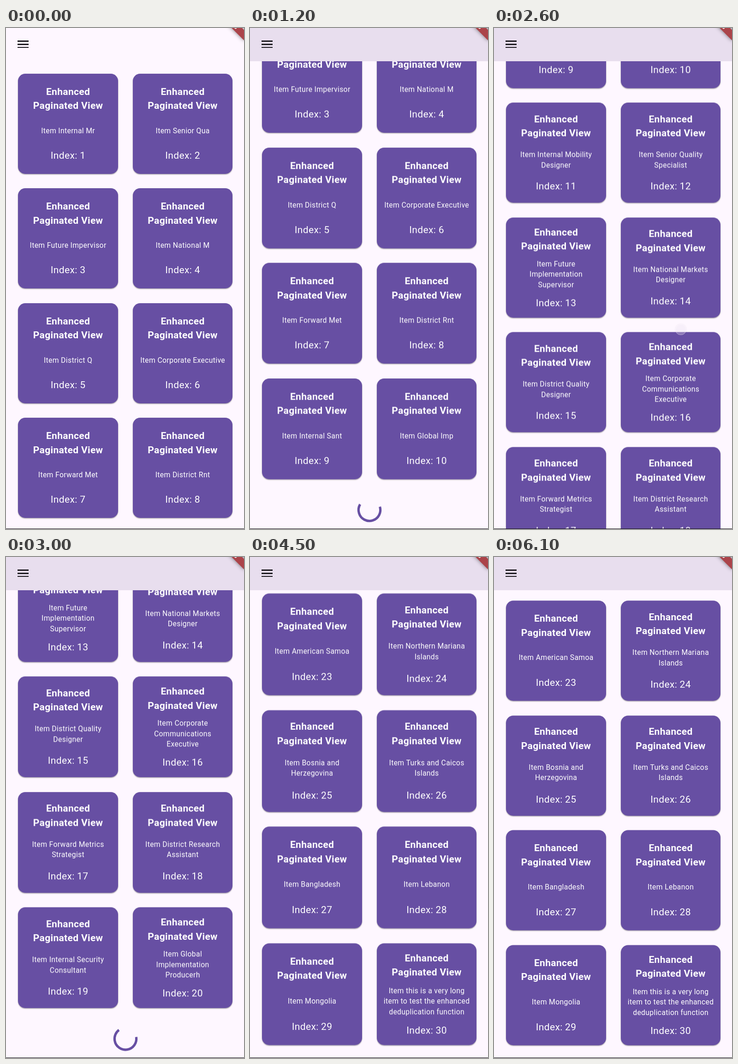
Write an HTML page that moves like this. It is 516x1085 px and loops after 6.2 s.

```html
<!DOCTYPE html>
<html lang="en">
<head>
<meta charset="utf-8">
<title>Paginated grid</title>
<style>
html, body { margin: 0; width: 100%; height: 100%; overflow: hidden; background: #fef7ff; }
#stage { position: relative; width: 516px; height: 1085px; overflow: hidden; background: #fef7ff;
  font-family: Roboto, "Noto Sans", sans-serif; color: #fff; letter-spacing: .3285px; }
#list { position: absolute; left: 0; top: 0; width: 516px; transform-origin: 0 0; will-change: transform; }
.card { position: absolute; width: 216.8px; height: 217px; border-radius: 15.8px; background: #674fa3;
  box-shadow: 0 1.3px 2px rgba(0, 0, 0, .28), 0 1px 3px rgba(0, 0, 0, .12); }
.card div { position: absolute; left: 0; width: 100%; text-align: center; white-space: pre;
  transform: translateY(-50%); }
.title { font-size: 21.02px; font-weight: 600; line-height: 30.4px; }
.name { font-size: 15.77px; line-height: 22.5px; }
.index { font-size: 21.02px; line-height: 30px; }
#spinner { position: absolute; left: 229px; width: 60px; height: 60px; }
#touch { position: absolute; left: 393px; width: 24px; height: 24px; margin-top: -12px; border-radius: 50%;
  box-sizing: border-box; background: rgba(236, 226, 240, .5); border: 1.5px solid rgba(255, 250, 255, .6);
  box-shadow: 0 0 2px rgba(90, 70, 110, .25); }
#bar { position: absolute; left: 0; top: 0; width: 516px; height: 71.7px; background: #e8deee; }
.menu { position: absolute; left: 25.2px; width: 23.65px; height: 2.6px; background: #1d1b20; }
#ribbon { position: absolute; left: 431.8px; top: -24.3px; width: 105px; height: 15.8px; line-height: 15.8px;
  transform: rotate(45deg); background: #ab444a; box-shadow: 0 0 8px rgba(0, 0, 0, .5);
  font-size: 13.4px; font-weight: 900; letter-spacing: 1.3px; text-align: center; }
#edge { position: absolute; left: 0; top: 1083.7px; width: 516px; height: 2px; background: #17131a; }
</style>
</head>
<body>
<div id="stage">
  <div id="list">
    <svg id="spinner" viewBox="-30 -30 60 60">
      <circle id="arc" r="23.65" fill="none" stroke="#674fa3" stroke-width="5.25" pathLength="360"/>
    </svg>
  </div>
  <div id="touch"></div>
  <div id="bar"></div>
  <div class="menu" style="top:27.4px"></div>
  <div class="menu" style="top:34px"></div>
  <div class="menu" style="top:40.6px"></div>
  <div id="ribbon">DEBUG</div>
  <div id="edge"></div>
</div>
<script>
const LOOP = 6200, STEP = 100, HEIGHT = 1085, PITCH = 248.5;
const $ = id => document.getElementById(id);

// "|" breaks a line
const names = [
  'Internal Mr', 'Senior Qua', 'Future Impervisor', 'National M', 'District Q',
  'Corporate Executive', 'Forward Met', 'District Rnt', 'Internal Sant', 'Global Imp',
  'Internal Mobility|Designer', 'Senior Quality|Specialist', 'Future|Implementation|Supervisor',
  'National Markets|Designer', 'District Quality|Designer', 'Corporate|Communications|Executive',
  'Forward Metrics|Strategist', 'District Research|Assistant', 'Internal Security|Consultant',
  'Global|Implementation|Producerh',
  'Saint Lucia', 'United Arab|Emirates', 'American Samoa', 'Northern Mariana|Islands',
  'Bosnia and|Herzegovina', 'Turks and Caicos|Islands', 'Bangladesh', 'Lebanon', 'Mongolia',
  'this is a very long|item to test the enhanced|deduplication function'
];

function addText(card, cls, y, text) {
  const el = document.createElement('div');
  el.className = cls;
  el.style.top = y + 'px';
  el.textContent = text;
  card.append(el);
}

const cards = names.map((name, i) => {
  const card = document.createElement('div');
  const lines = name.split('|').length;
  card.className = 'card';
  card.style.left = 26.2 + PITCH * (i % 2) + 'px';
  card.style.top = 98.7 + PITCH * (i >> 1) + 'px';
  addText(card, 'title', 57.8 - 3.55 * lines, 'Enhanced\nPaginated View');
  addText(card, 'name', 124, 'Item ' + name.replaceAll('|', '\n'));
  addText(card, 'index', 173.3 + 4 * lines, 'Index: ' + (i + 1));
  $('list').append(card);
  return card;
});

// [time, value] pairs, linear between
const scrollKeys = [[800, 0], [900, 40], [1000, 200], [1100, 332], [2300, 332], [2400, 420], [2600, 1179.5],
  [2700, 1490], [2800, 1574.5], [4100, 1574.5], [4200, 1700], [4400, 2590], [4460, 2737.5]];
const stretchKeys = [[1050, 0], [1100, .004], [1200, .006], [1600, 0], [2750, 0], [2800, .01], [2900, .009],
  [3200, 0], [4440, 0], [4500, .0157], [4600, .0135], [4900, .004], [5200, 0]];
const touchKeys = [[2400, 760], [2500, 653]];

function track(keys, t) {
  const n = keys.findIndex(k => k[0] > t);
  if (n === 0) return keys[0][1];
  if (n < 0) return keys[keys.length - 1][1];
  const [t0, a] = keys[n - 1], [t1, b] = keys[n];
  return a + (b - a) * (t - t0) / (t1 - t0);
}

const clamp = x => Math.min(1, Math.max(0, x));

// cubic-bezier(.4, 0, .2, 1)
function ease(x) {
  let lo = 0, hi = 1, s = .5;
  for (let i = 0; i < 24; i++) {
    s = (lo + hi) / 2;
    const bx = 1.2 * s * (1 - s) ** 2 + .6 * s * s * (1 - s) + s ** 3;
    if (bx < x) lo = s; else hi = s;
  }
  return s * s * (3 - 2 * s);
}

function drawSpinner(t) {
  const second = t > 2300;
  const age = t - (second ? 2620 : 855);
  const on = age >= 0 && t < (second ? 3700 : 2000);
  $('spinner').style.display = on ? '' : 'none';
  if (!on) return;
  $('spinner').style.top = 1345.7 + (second ? PITCH * 5 : 0) + 'px';
  const p = age / 1333 % 1;
  const head = ease(clamp(p * 2)), tail = ease(clamp(p * 2 - 1));
  const cap = 6.4;
  const start = -90 + tail * 270 + age / 2222 * 360 + p * 90 - cap;
  const sweep = (head - tail) * 270 + cap * 2;
  $('arc').setAttribute('stroke-dasharray', sweep + ' ' + (360 - sweep));
  $('arc').setAttribute('transform', 'rotate(' + start + ')');
}

function draw(t) {
  const scroll = track(scrollKeys, t), k = 1 + track(stretchKeys, t);
  // overscroll stretches from the bottom edge
  $('list').style.transform = `translateY(${HEIGHT * (1 - k) - k * scroll}px) scaleY(${k})`;
  const shown = t < 2000 ? 10 : t < 3700 ? 20 : 30;
  cards.forEach((card, i) => { card.style.display = i < shown ? '' : 'none'; });
  $('bar').style.opacity = clamp((t - 840) / 200);
  $('touch').style.opacity = t >= 2400 && t < 2700 ? (t < 2600 ? .9 : .6) : 0;
  $('touch').style.top = track(touchKeys, t) + 'px';
  drawSpinner(t);
}

const began = performance.now();
function tick() {
  const t = (performance.now() - began) % LOOP;
  draw(Math.floor(t / STEP) * STEP);
  requestAnimationFrame(tick);
}
tick();
</script>
</body>
</html>
```
